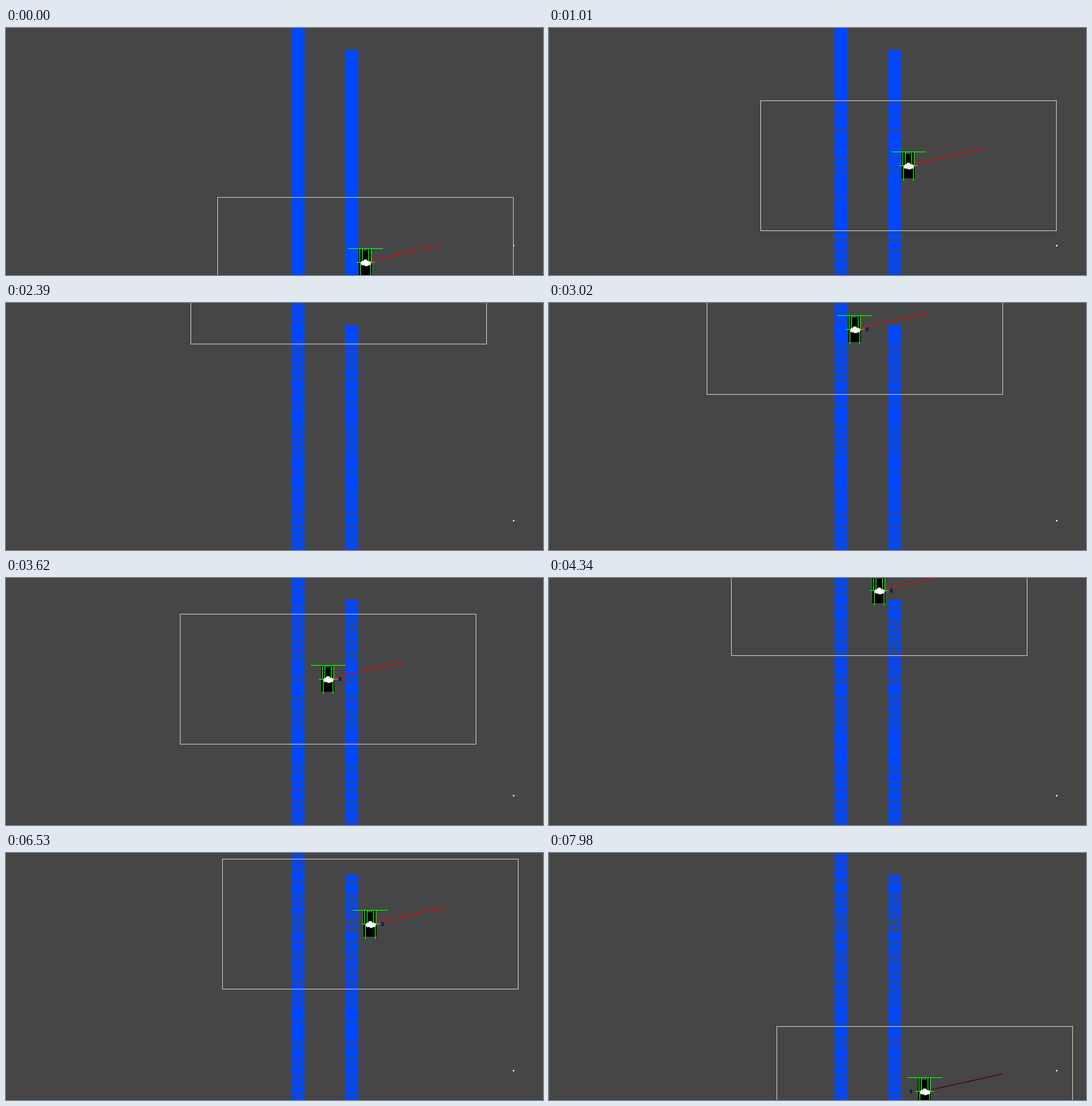
Write an HTML page with a canvas that moves like this. It is 661 by 304 pixels and loops after 8000 ms.

```html
<!DOCTYPE html>
<html>
<head>
<meta charset="utf-8">
<style>
html, body { margin: 0; width: 100%; height: 100%; overflow: hidden; background: #464646; }
canvas { display: block; }
</style>
</head>
<body>
<canvas id="stage" width="661" height="304"></canvas>
<script>
const ctx = document.getElementById('stage').getContext('2d');
const LOOP = 8000, STEP = 30;
const BOX_W = 364, BOX_H = 160;
const GREY = '#464646', GREEN = '#00ee00', BLUE = '#0047ff';
const LEFT_WALL = 352, RIGHT_WALL = 418, WALL_W = 16, RIGHT_TOP = 27;

const easeIn = power => u => u ** power;
const easeOut = power => u => 1 - (1 - u) ** power;
const linear = u => u;

// Follows moves of the form { to, at, ease }, "at" being the arrival time in seconds.
function follow(from, begin, moves, t) {
  for (const { to, at, ease = linear } of moves) {
    if (t < at) return from + (to - from) * ease(Math.max(0, (t - begin) / (at - begin)));
    from = to;
    begin = at;
  }
  return from;
}

const climbs = [
  { to: 89, at: 1.01, ease: easeOut(2) },
  { to: -12, at: 1.64, ease: easeOut(2) },
  { to: -110, at: 2.4, ease: easeOut(2) },
  { to: 10, at: 3.26, ease: easeIn(2) },
  { to: 102, at: 3.48 },
  { to: 8, at: 4.07, ease: easeOut(3.5) },
  { to: -82, at: 4.55, ease: easeOut(2) },
  { to: -69, at: 5.27, ease: easeOut(2) },
  { to: 3, at: 6.5, ease: easeOut(2.4) },
  { to: 213, at: 7.31, ease: easeIn(1.2) }
];
const drifts = [
  { to: 279, at: 1.95, ease: easeOut(2) },
  { to: 227, at: 2.39, ease: easeIn(1.2) },
  { to: 194, at: 2.68 },
  { to: 194, at: 3.48 },
  { to: 228, at: 3.75, ease: easeOut(1.2) },
  { to: 210, at: 4.12 },
  { to: 260, at: 5.27, ease: easeOut(1.6) },
  { to: 260, at: 6.4 },
  { to: 297, at: 6.9, ease: easeIn(1.35) },
  { to: 280, at: 8, ease: easeOut(4) }
];

// Two short hops away from the wall come before the long crossing.
function wallHop(t) {
  const u = ((t + .55) % .8) / .55;
  return t > .25 && t < 1.85 && u < 1 ? 18 * Math.sin(Math.PI * u) : 0;
}

const boxX = t => Math.round(follow(260, 1.85, drifts, t) + wallHop(t));
const boxY = t => Math.round(follow(208, 0, climbs, t));
const frameTime = frame => Math.max(0, frame * STEP - 10) / 1000;

function random(seed) {
  const s = Math.sin(seed * 127.1 + 3.7) * 43758.5453;
  return s - Math.floor(s);
}

function rect(color, x, y, w, h) {
  ctx.fillStyle = color;
  ctx.fillRect(x, y, w, h);
}

// Scratches left where the view frame and the aim line have crossed the walls.
function drawScratches(frame) {
  const rows = new Set();
  const scratch = y => {
    if (!rows.has(y - 1) && !rows.has(y + 1)) rows.add(y);
  };
  for (let i = 0; i < frame; i++) {
    const t = frameTime(i), top = boxY(t);
    if (random(i) < .3) scratch(top);
    if (random(i + 500) < .3) scratch(top + BOX_H);
    const reach = RIGHT_WALL - boxX(t) - BOX_W / 2;
    const aimY = Math.round(top + BOX_H / 2 - reach * .22);
    if (reach > 0 && aimY > RIGHT_TOP && random(i + 900) < .5) {
      rect(GREY, RIGHT_WALL + Math.floor(random(i) * 8), aimY, 7, 1);
    }
  }
  ctx.globalAlpha = .7;
  for (const y of rows) {
    rect(GREY, LEFT_WALL, y, WALL_W, 1);
    if (y >= RIGHT_TOP) rect(GREY, RIGHT_WALL, y, WALL_W, 1);
  }
  ctx.globalAlpha = 1;
}

function drawAim(t) {
  const stroke = (color, width, dash) => {
    ctx.strokeStyle = color;
    ctx.lineWidth = width;
    ctx.setLineDash(dash);
    ctx.beginPath();
    ctx.moveTo(8, -1.5);
    ctx.lineTo(96, -21);
    ctx.stroke();
  };
  const landed = t > 7.31, onLedge = t > 4.9 && t < 5.7;
  if (landed || onLedge) stroke('#000', 1, []);
  if (landed) stroke('#c80000', 1, [2, 2]);
  else if (!onLedge) stroke('#f00', 1.5, [6, 4]);
}

function drawPlayer(x, y, t) {
  ctx.save();
  ctx.translate(x, y);
  rect('#000', -8, -16, 16, 32);
  rect(GREEN, -21, -17, 43, 1);
  rect(GREY, -3, -16, 6, 2);
  for (const side of [-1, 1]) {
    rect(GREEN, side * 7, -17, 1, 17);
    rect(GREEN, side * 4, -17, 1, 17);
    rect(GREEN, side * 6, 0, 1, 19);
  }
  rect(GREEN, -11, 0, 23, 1);
  drawAim(t);
  if (t > 2.6) rect('#10205c', t > 7.31 ? -18 : 14, -2, 3, 5);
  ctx.fillStyle = '#fff';
  for (const [cx, cy] of [[-3, 1], [0, -1], [4, 1], [1, 2]]) {
    ctx.beginPath();
    ctx.arc(cx + .5, cy + .5, 2.8, 0, Math.PI * 2);
    ctx.fill();
  }
  ctx.restore();
}

function draw(ms) {
  const frame = Math.floor((ms + 10) / STEP), t = frameTime(frame);
  const x = boxX(t), y = boxY(t);
  rect(GREY, 0, 0, 661, 304);
  rect('#404040', 0, 303, 661, 1);
  rect(BLUE, LEFT_WALL, 0, WALL_W, 304);
  rect(BLUE, RIGHT_WALL, RIGHT_TOP, WALL_W, 304);
  drawScratches(frame);
  rect('#fff', 624, 267, 2, 2);
  rect('#7070ff', 625, 268, 1, 1);
  drawPlayer(x + BOX_W / 2, y + BOX_H / 2, t);
  ctx.setLineDash([]);
  ctx.lineWidth = 1;
  ctx.strokeStyle = '#b0b0b0';
  ctx.strokeRect(x + .5, y + .5, BOX_W, BOX_H);
}

const start = performance.now();
function tick() {
  draw((performance.now() - start) % LOOP);
  requestAnimationFrame(tick);
}
tick();
</script>
</body>
</html>
```
